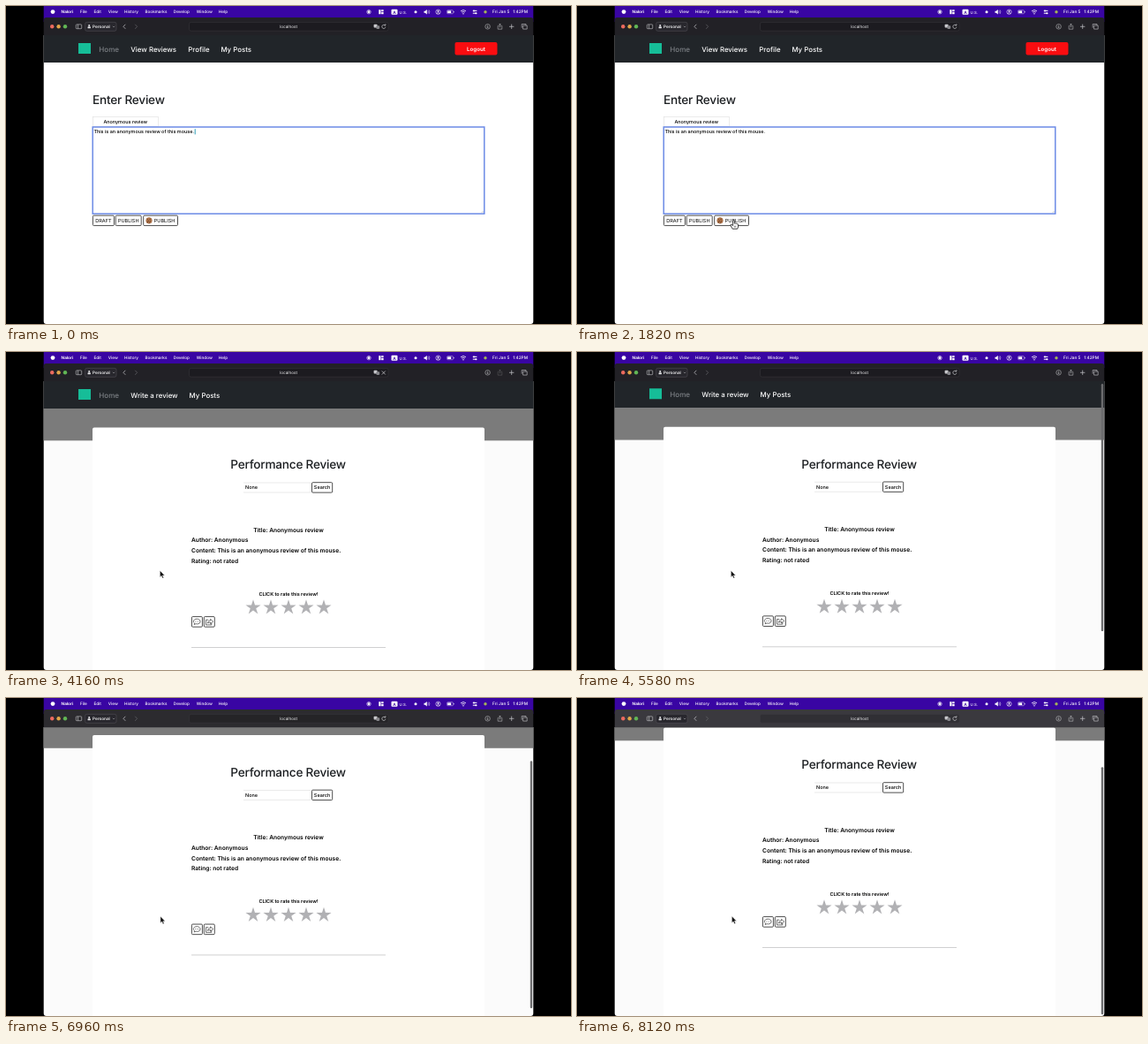
Animation of 640 by 360 pixels, one loop 8220 ms. Source, as an HTML page:

```html
<!DOCTYPE html>
<html lang="en">
<head>
<meta charset="utf-8">
<title>Anonymous review</title>
<style>
  html, body { margin: 0; width: 100%; height: 100%; overflow: hidden; background: #000; }
  svg { display: block; width: 100vw; height: 100vh; }
  text { font-family: Inter, "Open Sans", sans-serif; white-space: pre; text-rendering: geometricPrecision; }
</style>
</head>
<body>
<svg id="stage" viewBox="0 0 640 360">
  <defs>
    <clipPath id="view"><path d="M42.7 33H597.3V357q0 3-3 3H45.7q-3 0-3-3Z"/></clipPath>
  </defs>
  <rect width="640" height="360" fill="#000"/>
  <g clip-path="url(#view)">
    <g id="form"></g>
    <g id="review"></g>
    <rect id="bar" x="593.8" width="2.4" height="280" rx="1.2" fill="#6c6c6e"/>
  </g>
  <g id="chrome"></g>
  <g id="reload" fill="none" stroke="#c9c9cd" stroke-width=".7">
    <path d="M429.6 22.1a2.1 2.1 0 1 0 .4 1.6M428.3 21.9h1.6v-1.7"/>
  </g>
  <path id="stop" d="M425.8 21.5l4 4m0-4l-4 4" stroke="#d4d4d8" stroke-width=".7"/>
  <g id="hand">
    <path d="M-.9 .7Q0-.5.9.7V3.7q1-.6 1.5.2q1-.5 1.5.3q1.2-.3 1.2.9V7.6L4.2 9.8H-1.3L-3.4 6.2Q-3.9 4.7-2.7 4.8L-.9 6Z"
      fill="#fff" stroke="#111" stroke-width=".8" stroke-linejoin="round"/>
    <path d="M.8 6.2v2M2.3 6.2v2" stroke="#111" stroke-width=".5"/>
  </g>
  <path id="arrow" d="M0 0V7.5L1.7 5.9L2.9 8.7L4.2 8.1L3 5.5H5.3Z" fill="#111" stroke="#fff" stroke-width=".4"/>
</svg>
<script>
const $ = id => document.getElementById(id);

const text = (x, y, size, label, extra = '') =>
  `<text x="${x}" y="${y}" font-size="${size}" ${extra}>${label}</text>`;
const rect = (x, y, w, h, fill, extra = '') =>
  `<rect x="${x}" y="${y}" width="${w}" height="${h}" fill="${fill}" ${extra}/>`;
const dot = (x, y, r, fill, extra = '') =>
  `<circle cx="${x}" cy="${y}" r="${r}" fill="${fill}" ${extra}/>`;
const line = (d, color = '#c9c9cd', width = .7) =>
  `<path d="${d}" fill="none" stroke="${color}" stroke-width="${width}"/>`;
const semibold = 'font-weight="600"';
const medium = 'font-weight="500"';
const white = 'fill="#fff" font-weight="500"';
const middle = 'text-anchor="middle"';
const heading = 'font-weight="500" letter-spacing="-.22" fill="#1b1e21"';

const button = (x, y, w, h = 11.4) =>
  rect(x, y, w, h, '#fff', 'rx="1.1" stroke="#2e2e2e" stroke-width=".85"');

const navbar = links =>
  rect(42, 33, 556, 31, '#212529') +
  rect(82, 42, 14, 12, '#16bd98') +
  text(105.3, 51.6, 8.05, 'Home', 'fill="#7b7f84" font-weight="500"') +
  links.map(([x, label]) => text(x, 51.6, 7.85, label, white)).join('');

function star(cx, cy, r) {
  const points = Array.from({ length: 10 }, (_, i) => {
    const radius = i % 2 ? r * .38 : r, a = i * Math.PI / 5;
    return `${(cx + radius * Math.sin(a)).toFixed(2)},${(cy - radius * Math.cos(a)).toFixed(2)}`;
  });
  return `<polygon points="${points.join(' ')}" fill="#b1b1b4"/>`;
}

function cookie(x, y) {
  const chips = [[-1.3, -1], [1, -1.5], [1.6, .7], [-.2, .5], [-1.5, 1.5], [.5, 2.1]];
  return dot(x, y, 3.3, '#b97a4c', 'stroke="#8d5936" stroke-width=".5"') +
    chips.map(([dx, dy]) => dot(x + dx, y + dy, .55, '#59331f')).join('');
}

function buildForm() {
  $('form').innerHTML =
    rect(42, 33, 556, 327, '#fff') +
    navbar([[141.3, 'View Reviews'], [206.3, 'Profile'], [243.4, 'My Posts']]) +
    rect(508.5, 41, 48, 14.6, '#fa0d10', 'rx="2"') +
    text(532.5, 50.5, 6.2, 'Logout', `fill="#fff" ${semibold} ${middle}`) +
    text(98, 110.6, 13.6, 'Enter Review', heading) +
    rect(98.3, 125.5, 74.2, 11, '#fff', 'stroke="#dedede" stroke-width=".6"') +
    text(110.4, 133.4, 5.45, 'Anonymous review', medium) +
    rect(98.2, 137, 443.6, 98.2, '#fff', 'stroke="#6c8be6" stroke-width="1.5"') +
    line('M538.6 234l2-2m-.6 2l.6-.6', '#888', .4) +
    text(99.4, 144.4, 5.46, 'This is an anonymous review of this mouse.', medium) +
    '<rect id="caret" x="213.7" y="139.2" width="1" height="6.2" fill="#2f9fb8"/>' +
    button(98.4, 237.2, 24) + text(110.4, 245, 5.55, 'DRAFT', middle) +
    button(124.2, 237.2, 29) + text(138.7, 245, 5.55, 'PUBLISH', middle) +
    button(155.7, 237.2, 38.8) + cookie(162, 242.9) + text(167.8, 245, 5.55, 'PUBLISH');
}

function buildReview() {
  const bubble = 'M212.3 305.2c0-4 7.8-4 7.8 0c0 2.7-3.6 3.1-5 2.5l-2 .8l.4-1.5q-1.2-.8-1.2-1.8Z';
  const share = 'M229.3 303.2h-2.8v5.7h6.3v-2M228.4 307c.4-2.1 1.5-3 3.2-3v-1.6l3 2.7l-3 2.6v-1.6q-1.8-.2-3.2.9Z';
  $('review').innerHTML =
    rect(42, 33, 556, 460, '#fbfbfb') +
    rect(42, 64, 556, 36.3, '#7b7b7b') +
    navbar([[141.3, 'Write a review'], [207.6, 'My Posts']]) +
    rect(98, 85.5, 444, 420, '#fff', 'rx="2"') +
    text(319.6, 132.3, 13.6, 'Performance Review', `${heading} ${middle}`) +
    line('M269 148H345M269 159H345', '#dcdcdc', .6) +
    text(271, 155.3, 5.5, 'None', medium) +
    button(346.5, 147.7, 23.2) + text(358.1, 155.3, 5.5, 'Search', `${medium} ${middle}`) +
    text(320, 203.8, 6.65, 'Title: Anonymous review', `${semibold} ${middle}`) +
    ['Author: Anonymous', 'Content: This is an anonymous review of this mouse.', 'Rating: not rated']
      .map((label, i) => text(210, 215.4 + i * 11.8, 6.65, label, semibold)).join('') +
    text(320, 275.7, 5.53, 'CLICK to rate this review!', `${semibold} ${middle}`) +
    [0, 1, 2, 3, 4].map(i => star(280 + i * 20, 289.2, 9)).join('') +
    button(210.4, 299.6, 12, 11.6) + button(224.3, 299.6, 12, 11.6) +
    line(bubble, '#333') + line(share, '#333') +
    [214.4, 216.2, 218].map(x => dot(x, 305.1, .45, '#333')).join('') +
    line('M210 334.5H430', '#c4c4c6', .8);
}

function buildChrome() {
  const menus = [[84, 'File'], [99.4, 'Edit'], [115.8, 'View'], [134, 'History'],
    [157.5, 'Bookmarks'], [189.8, 'Develop'], [215.7, 'Window'], [240.8, 'Help']];
  const menuBar =
    rect(42.7, 0, 554.6, 18, '#3905a3') +
    dot(53, 6.6, 2.4, '#fff') +
    text(62.6, 8.4, 4.65, 'Nalori', 'fill="#fff" font-weight="700"') +
    menus.map(([x, label]) => text(x, 8.4, 4.65, label, white)).join('') +
    dot(411, 6.7, 2.2, 'none', 'stroke="#fff" stroke-width=".6"') + dot(411, 6.7, 1.4, '#fff') +
    rect(422.3, 4.2, 2.2, 5, '#fff') + rect(425.2, 4.2, 2.4, 2.1, '#fff') + rect(425.2, 7, 2.4, 2.2, '#fff') +
    rect(436.5, 3.8, 7, 6, '#fff', 'rx="1"') +
    text(440, 8.5, 4.8, 'A', `fill="#3905a3" ${semibold} ${middle}`) +
    text(445.6, 8.5, 4.3, 'U.S.', white) +
    dot(464, 6.7, 1.5, '#fff') +
    '<path d="M473.5 5.7h1.3l2-1.7v5.4l-2-1.7h-1.3Z" fill="#fff"/>' +
    line('M477.8 5.2q1 1.5 0 3M479 4.4q1.7 2.3 0 4.6', '#fff', .5) +
    dot(489.5, 6.7, 2.6, 'none', 'stroke="#fff" stroke-width=".6"') +
    dot(489.5, 6, .9, '#fff') + line('M487.9 8.5q1.6-1.7 3.2 0', '#fff') +
    rect(499.5, 4.7, 7, 4, 'none', 'rx="1" stroke="#d9cff0" stroke-width=".5"') +
    rect(500.2, 5.4, 4, 2.6, '#fff') + line('M507.4 6v1.4', '#d9cff0') +
    line('M515 5.8q3-2.6 6 0M516.2 7.2q1.8-1.5 3.6 0', '#fff', .8) + dot(518, 8.8, .7, '#fff') +
    line('M528.8 5.4h4.6M528.8 8.2h4.6', '#fff', 1) + dot(530, 5.4, 1, '#fff') + dot(532.3, 8.2, 1, '#fff') +
    dot(543, 6.7, 1.7, '#a3b35a') +
    text(551, 8.4, 4.75, 'Fri Jan 5', white) +
    text(591, 8.4, 4.75, '1:42PM', `${white} text-anchor="end"`);

  const outline = 'M42.7 33.3V16q0-3 3-3H594.3q3 0 3 3V33.3Z';
  const toolbar =
    `<path d="${outline}" fill="#222126"/><path id="tint" d="${outline}" fill="#fff"/>` +
    ['#ec6a5e', '#e0a548', '#61b655'].map((c, i) => dot(52.2 + i * 7.4, 23.3, 2.2, c)).join('') +
    rect(79.3, 20.9, 6.4, 4.8, 'none', 'rx=".8" stroke="#c9c9cd" stroke-width=".6"') +
    line('M81.5 21v4.6', '#c9c9cd', .6) +
    rect(89.6, 18.3, 35.4, 10, '#28272d', 'rx="2" stroke="#515057" stroke-width=".6"') +
    dot(94.2, 22, 1, '#e4e4e7') + rect(92.5, 23.3, 3.4, 2, '#e4e4e7', 'rx=".9"') +
    text(98, 25.1, 4.7, 'Personal', `fill="#f1f1f3" ${semibold}`) +
    line('M120.8 22.8l1.2 1.2l1.2-1.2', '#b9b9bd', .5) +
    line('M135.3 20.8l-2.4 2.5l2.4 2.5') +
    line('M146.2 20.8l2.4 2.5l-2.4 2.5', '#66666b') +
    rect(207.5, 18.4, 225.5, 9.8, '#000', 'fill-opacity=".17" rx="2" stroke="#3a393f" stroke-width=".5"') +
    text(320, 25.2, 4.65, 'localhost', `fill="#f1f1f3" ${middle}`) +
    rect(416.6, 20.8, 4, 3.8, '#c9c9cd', 'rx=".8"') + rect(419.4, 22.3, 3.8, 3.6, '#85858a', 'rx=".8"') +
    dot(545.6, 23.3, 2.8, 'none', 'stroke="#b9b9bd" stroke-width=".6"') +
    line('M545.6 21.6v3m-1.2-1l1.2 1.2l1.2-1.2', '#b9b9bd', .6) +
    `<g id="share">${line('M558.5 22.6h-1.3v3.6h4.6v-3.6h-1.3M559.5 24.3v-4.2m-1.3 1.3l1.3-1.4l1.3 1.4', '#b9b9bd', .6)}</g>` +
    line('M572.7 20.6v5.4M570 23.3h5.4') +
    line('M585.6 22.1h4.6v4h-4.6ZM584.2 24.7v-4.2h4.8v1.5', '#c9c9cd', .6);

  $('chrome').innerHTML = menuBar + toolbar;
}

const LOOP = 8220;
const SUBMIT = 72, PAGE = 76, LOADED = 97, SCROLL_START = 116, SCROLL_END = 159, SCROLL_MAX = 52;

// Steps come in threes, held for 100, 20 and 20 ms.
function stepAt(ms) {
  const r = ms % 140;
  return Math.floor(ms / 140) * 3 + (r < 100 ? 0 : r < 120 ? 1 : 2);
}

function ease(n, from, to) {
  const p = Math.min(1, Math.max(0, (n - from) / (to - from)));
  return p * p * (3 - 2 * p);
}

const show = (id, on) => $(id).setAttribute('visibility', on ? 'visible' : 'hidden');
const move = (id, x, y) => $(id).setAttribute('transform', `translate(${x} ${y})`);

function render(ms) {
  const n = stepAt(ms);
  const onReview = n >= PAGE;
  const loading = n >= SUBMIT && n < LOADED;
  const scroll = SCROLL_MAX * ease(n, SCROLL_START, SCROLL_END);

  $('form').style.display = onReview ? 'none' : '';
  $('review').style.display = onReview ? '' : 'none';
  $('caret').style.display = n / 22.3 % 1 < .5 ? '' : 'none';
  move('review', 0, -scroll);

  show('bar', n > SCROLL_START);
  $('bar').setAttribute('y', 35.5 + scroll * .82);
  show('reload', !loading);
  show('stop', loading);
  $('share').setAttribute('opacity', loading ? .35 : 1);
  // The translucent toolbar brightens as the page slides under it.
  $('tint').setAttribute('opacity', .11 * ease(n, 135, 165));

  const approach = ease(n, 20, 34), settle = ease(n, 46, 62);
  const x = 212 - 34.5 * approach - .7 * settle;
  const y = 206 + 36.5 * approach + 5.8 * settle;
  const overButton = n >= 32;
  show('hand', overButton && !onReview);
  show('arrow', onReview || (n >= 20 && !overButton));
  move('hand', x, y);
  if (onReview) move('arrow', 174.4 + ease(n, 135, 160), 247.4 - .4 * ease(n, 135, 160));
  else move('arrow', x, y);
}

buildForm();
buildReview();
buildChrome();

const start = performance.now();
function tick() {
  render((performance.now() - start) % LOOP);
  requestAnimationFrame(tick);
}
render(0);
requestAnimationFrame(tick);
</script>
</body>
</html>
```
